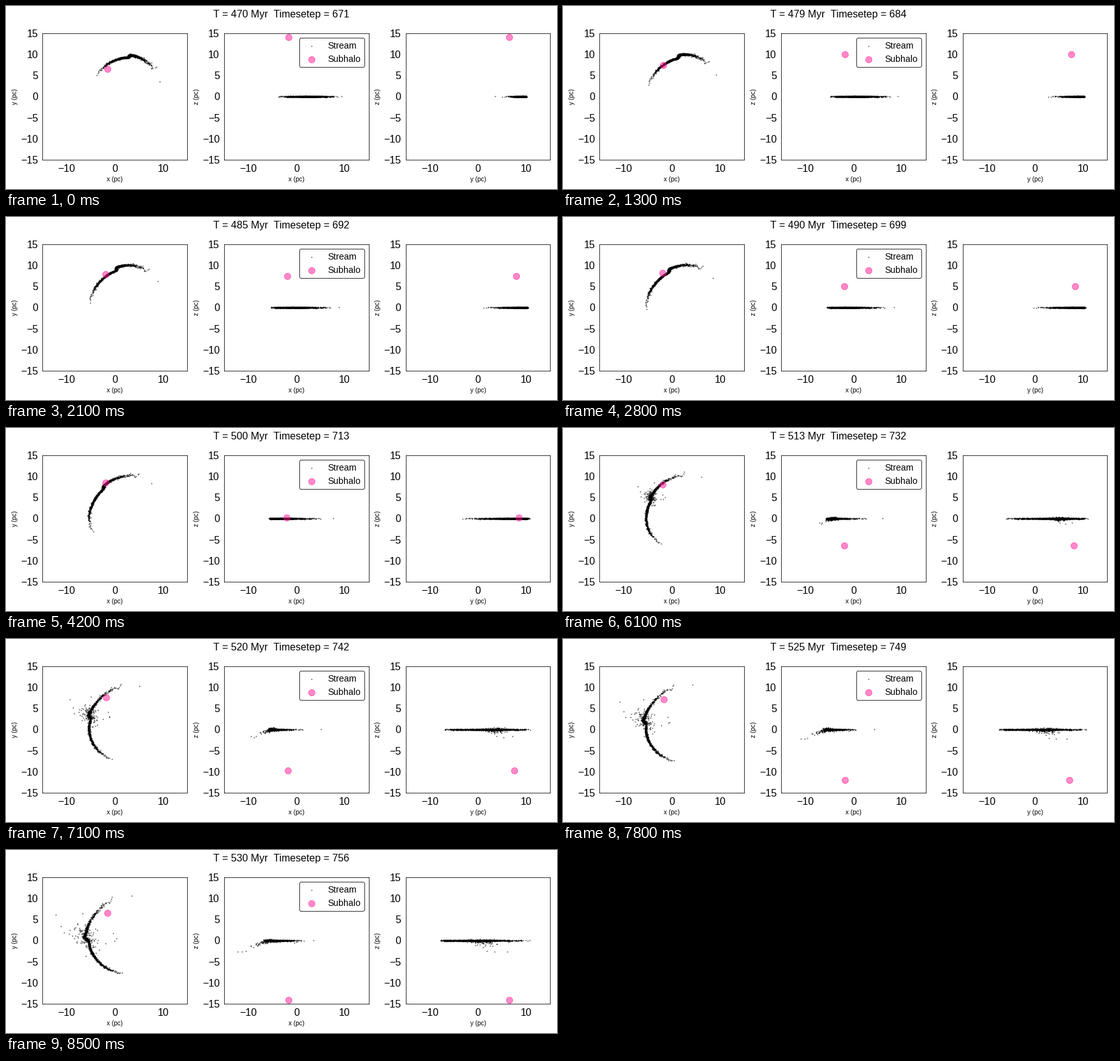
Animation of 864x288 px, one loop 8600 ms. Source, as a matplotlib script:

```python
import numpy as np
import matplotlib.pyplot as plt
from matplotlib.animation import FuncAnimation

FRAMES, INTERVAL = 86, 100
W, H = 864, 288
FIRST_STEP, MYR_PER_STEP = 671, 700 / 999
HIT = 42          # frame at which the subhalo crosses the stream
KNOT = 73.0       # starting angle of the progenitor, degrees

plt.rcParams.update({
    "font.family": "Liberation Sans",
    "axes.edgecolor": "black",
    "axes.linewidth": 0.8,
    "xtick.major.size": 0, "ytick.major.size": 0,
    "xtick.major.pad": 7, "ytick.major.pad": 7,
    "xtick.labelsize": 16, "ytick.labelsize": 16,
    "axes.labelsize": 10,
})


def polar_curve(angles, radii, degree):
    """Smooth radius as a function of angle in degrees."""
    fit = np.polynomial.Polynomial.fit(angles, radii, degree)
    return lambda a: fit(np.clip(a, angles[0], angles[-1]))


lead_radius = polar_curve(
    [72, 87, 97, 110, 124, 146, 170, 185, 206, 227, 252, 270, 285],
    [9.75, 8.9, 8.16, 7.43, 6.63, 5.77, 5.48, 5.42, 5.55, 5.87, 6.61, 7.4, 8.1],
    6)
trail_base = polar_curve(
    [20, 30, 40, 52, 61, 70, 79, 87, 94, 100, 109, 118, 129, 143, 152, 172],
    [9.9, 10.25, 10.5, 10.5, 10.5, 10.4, 10.15, 9.7, 9.2, 8.75, 8.0, 7.4,
     6.85, 6.45, 6.35, 6.5],
    7)


def trail_radius(a, k):
    tail = 0.8 * min(k / HIT, 1) * np.clip((85 - a) / 25, 0, 1)
    late = 0.45 * max(k - HIT, 0) / HIT * np.clip((165 - a) / 30, 0, 1)
    return trail_base(a) + tail + late


def drift(start, momentum, mix):
    """Angles and radii in every frame; mix runs from leading to trailing."""
    a = start.copy()
    angles, radii = [], []
    for k in range(FRAMES):
        r = (1 - mix) * lead_radius(a) + mix * trail_radius(a, k)
        angles.append(a)
        radii.append(r)
        a = a + np.degrees(momentum / r**2)
    return np.array(angles), np.array(radii)


def build_stream(n_lead=500, n_trail=420, n_knot=130):
    rng = np.random.default_rng(11)
    ahead = np.minimum(np.abs(rng.normal(0, 17, n_lead)), 54)
    behind = rng.exponential(9, n_trail) % 34
    behind[0] = KNOT - 20.8
    blend = rng.uniform(0, 1, n_knot)

    start = KNOT + np.r_[ahead, -behind, rng.normal(0, 0.8, n_knot)]
    mix = np.r_[np.zeros(n_lead), np.ones(n_trail), blend]
    momentum = np.r_[1.10 + 0.07 * np.minimum(ahead / 30, 1),
                     np.full(n_trail, 1.28), 1.10 + 0.18 * blend]
    width = np.r_[0.08 + 0.002 * ahead, 0.09 + 0.004 * behind,
                  np.full(n_knot, 0.12)]
    width[n_lead] = 0

    n = len(start)
    ang, rad = drift(start, momentum, mix)
    rad = rad + rng.normal(0, 1, n) * width
    x = rad * np.cos(np.radians(ang))
    y = rad * np.sin(np.radians(ang))
    z = np.tile(rng.normal(0, 0.05, n), (FRAMES, 1))

    # Stars near the crossing point are thrown out of the stream.
    near = np.exp(-((ang[HIT] - 106) / 6) ** 2)
    hit = rng.random(n) < 0.42 * near
    m = hit.sum()
    vx = np.clip(0.022 * rng.standard_t(1.8, m), -0.137, 0.14)
    out = vx < 0
    vy = np.where(out, -0.6 * vx + rng.normal(0, 0.02, m),
                  rng.normal(0, 0.035, m))
    vz = np.where(out, 0.5 * vx, -0.1 * vx)
    lift = rng.normal(0.1, 0.25, m)
    dt = np.maximum(np.arange(FRAMES) - HIT, 0)[:, None]
    x[:, hit] += vx * dt
    y[:, hit] += vy * dt
    z[:, hit] += vz * dt + lift * np.sin(0.05 * dt)
    return np.stack([x, y, z], axis=-1)


def subhalo(k):
    t = k - 42.5
    return np.array([-2.02 * np.cos(0.0155 * t),
                     8.5 * np.cos(0.0163 * t),
                     -26.9 * np.sin(0.013 * t)])


stream = build_stream()
fig = plt.figure(figsize=(W / 72, H / 72), dpi=72, facecolor="white")
title = fig.suptitle("", fontsize=16)

PLANES = [(0, 1), (0, 2), (1, 2)]
panels = []
for i, (u, v) in enumerate(PLANES):
    left = 57.45 + 284.55 * i
    ax = fig.add_axes([left / W, 46 / H, 226.9 / W, 199 / H])
    ax.set(xlim=(-15, 15), ylim=(-15, 15),
           xticks=[-10, 0, 10], yticks=range(-15, 16, 5),
           xlabel=f"{'xyz'[u]} (pc)", ylabel=f"{'xyz'[v]} (pc)")
    stars = ax.scatter([], [], s=1, color="black", alpha=0.5, label="Stream")
    halo = ax.scatter([], [], s=100, color="deeppink", alpha=0.5,
                      label="Subhalo")
    panels.append((stars, halo, [u, v]))
    if i == 1:
        ax.legend(loc="upper right", fontsize=14, edgecolor="black")


def update(k):
    step = FIRST_STEP + k
    title.set_text(f"T = {step * MYR_PER_STEP:.0f} Myr  Timesetep = {step}")
    for stars, halo, axes in panels:
        stars.set_offsets(stream[k][:, axes])
        halo.set_offsets(subhalo(k)[axes][None])
    return [title]


anim = FuncAnimation(fig, update, frames=FRAMES, interval=INTERVAL,
                     init_func=lambda: update(0), repeat=True, blit=False)
plt.show()
```
